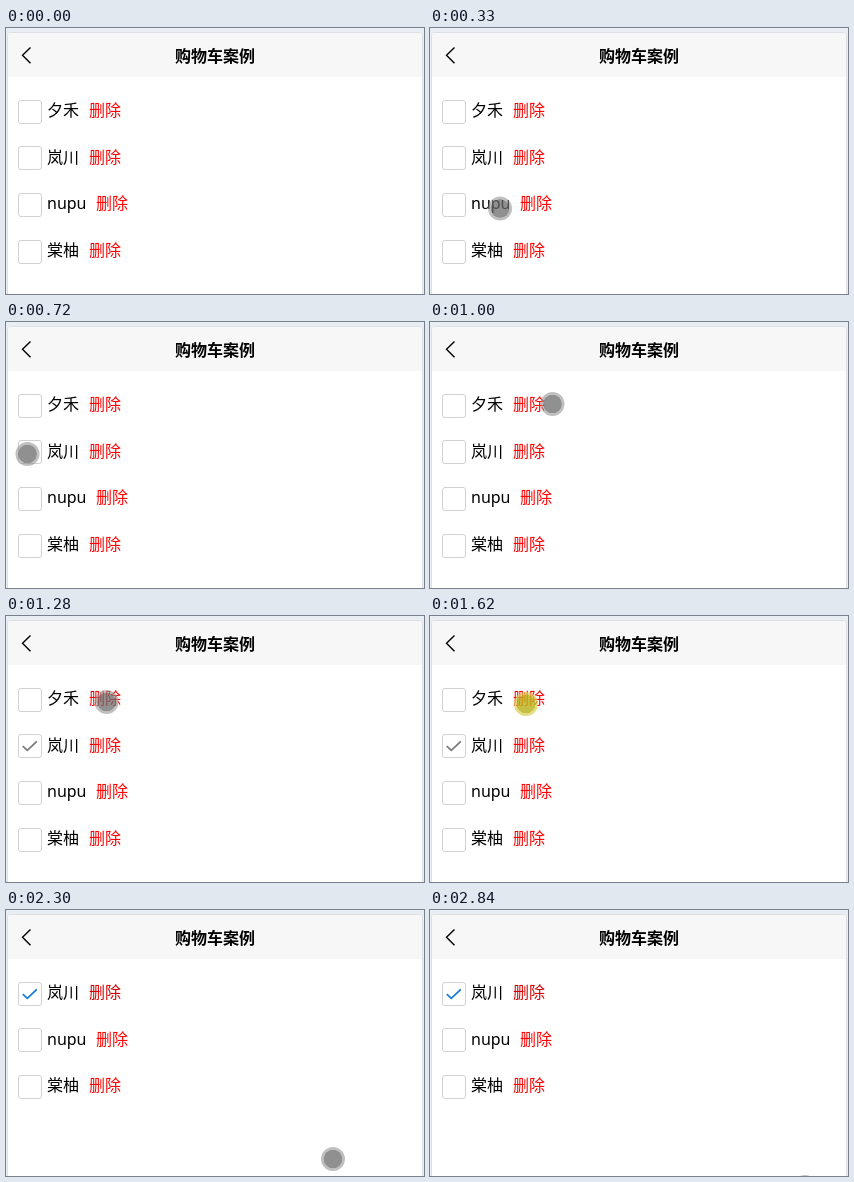
Animation, 418 px wide and 266 px high, one loop 2.97 s. Source, as an HTML page:

```html
<!DOCTYPE html>
<html lang="zh-CN">
<head>
<meta charset="utf-8">
<title>购物车案例</title>
<style>
  html, body { margin: 0; width: 100%; height: 100%; overflow: hidden; background: #e9edf4; }
  svg { display: block; width: 418px; height: 266px; }
  text { font: 16px "Noto Sans", "Noto Sans CJK SC", "Noto Sans CJK", sans-serif; fill: #000; }
  .title { font-weight: 700; text-anchor: middle; }
  .box { fill: #fff; stroke: #d1d1d1; }
  .check { fill: none; stroke-width: 1.7; }
  .remove { fill: #f00; }
  .remove.dark { fill: #d40000; }
  #cursor .ring { fill: none; stroke: rgba(150, 150, 150, .6); stroke-width: 2.5; }
  #cursor .disc { fill: rgba(105, 105, 105, .74); }
  #cursor.pressed .ring { stroke: rgba(215, 205, 75, .7); }
  #cursor.pressed .disc { fill: rgba(186, 178, 25, .82); }
</style>
</head>
<body>
<svg viewBox="0 0 418 266">
  <rect x="1.5" y="4.5" width="415" height="300" rx="3" fill="#fff" stroke="#dcdfe4"/>
  <path d="M2 49V8q0-3 3-3H413q3 0 3 3V49Z" fill="#f7f7f7"/>
  <path d="M24.5 19.5L16.5 27.3L24.5 35.2" fill="none" stroke="#000" stroke-width="1.4"/>
  <text class="title" x="209" y="34">购物车案例</text>
  <g id="list"></g>
  <g id="cursor">
    <circle class="disc" r="9.5"/>
    <circle class="ring" r="10.75"/>
  </g>
</svg>
<script>
const LOOP = 2970;
const TICK = 67.6; // the screen refreshes in steps of this many ms
const ROW_PITCH = 46.67;

// All times below are counted in ticks.
const CHECK_AT = 16;
const DELETE_AT = 27;
const CLICKS = [12, 24];

const linear = u => u;
const easeIn = power => u => u ** power;
const easeOut = power => u => 1 - (1 - u) ** power;

const checkbox = [21.5, 132];
const besideLink = [122.5, 82];
const onLink = [96, 88];

const glides = [
  { start: 1, end: 11, from: [327, 242], to: checkbox, easeX: easeOut(3.6), easeY: easeOut(1.6) },
  { start: 11, end: 13, from: checkbox, to: checkbox },
  { start: 13, end: 15, from: checkbox, to: besideLink },
  { start: 15, end: 21, from: besideLink, to: onLink, easeX: easeOut(1.6) },
  { start: 21, end: 24, from: onLink, to: onLink },
  { start: 24, end: 28, from: onLink, to: [250, 280], easeX: easeIn(3), easeY: easeIn(3) },
  { start: 33, end: 35, from: [338, 260], to: [316, 238] },
  { start: 42, end: 45, from: [375, 277], to: [375, 277] }
];

const cursor = document.getElementById("cursor");
const list = document.getElementById("list");

function add(parent, tag, attrs, content = "") {
  const node = document.createElementNS("http://www.w3.org/2000/svg", tag);
  for (const key in attrs) node.setAttribute(key, attrs[key]);
  node.textContent = content;
  return parent.appendChild(node);
}

function makeRow(name, nameWidth) {
  const row = add(list, "g", {});
  const control = add(row, "g", {});
  add(control, "rect", { class: "box", x: 12.5, y: .5, width: 23, height: 23, rx: 2.5 });
  const check = add(control, "path", { class: "check", d: "M16.8 12.2L21.3 16.3L30.8 7.3" });
  const label = add(row, "g", {});
  add(label, "text", { x: 41, y: 0 }, name);
  const remove = add(label, "text", { class: "remove", x: 51 + nameWidth, y: 0 }, "删除");
  return { row, control, check, label, remove };
}

const rows = [makeRow("夕禾", 32), makeRow("岚川", 32), makeRow("nupu", 39), makeRow("棠柚", 32)];

function moveTo(node, x, y) {
  node.setAttribute("transform", `translate(${x} ${y})`);
}

function renderRow({ row, control, check, label, remove }, index, tick) {
  const removed = tick >= DELETE_AT;
  const slot = removed ? index - 1 : index;
  const top = 72 + slot * ROW_PITCH;
  row.style.display = slot < 0 ? "none" : "";
  moveTo(control, 0, Math.floor(top));
  moveTo(label, 0, Math.round(top + 16));
  check.style.display = index === 1 && tick >= CHECK_AT ? "" : "none";
  check.style.stroke = removed ? "#107bdc" : "#777";
  remove.classList.toggle("dark", removed && slot === 0);
}

function renderCursor(tick) {
  const glide = glides.find(({ start, end }) => tick >= start && tick < end);
  cursor.style.display = glide ? "" : "none";
  cursor.classList.toggle("pressed", CLICKS.includes(tick));
  if (!glide) return;
  const { start, end, from, to, easeX = linear, easeY = linear } = glide;
  const u = (tick - start) / (end - start);
  moveTo(cursor, from[0] + (to[0] - from[0]) * easeX(u), from[1] + (to[1] - from[1]) * easeY(u));
}

function render(time) {
  const tick = Math.floor(time / TICK + .4);
  rows.forEach((row, index) => renderRow(row, index, tick));
  renderCursor(tick);
}

const begin = performance.now();
function loop() {
  render((performance.now() - begin) % LOOP);
  requestAnimationFrame(loop);
}
loop();
</script>
</body>
</html>
```
